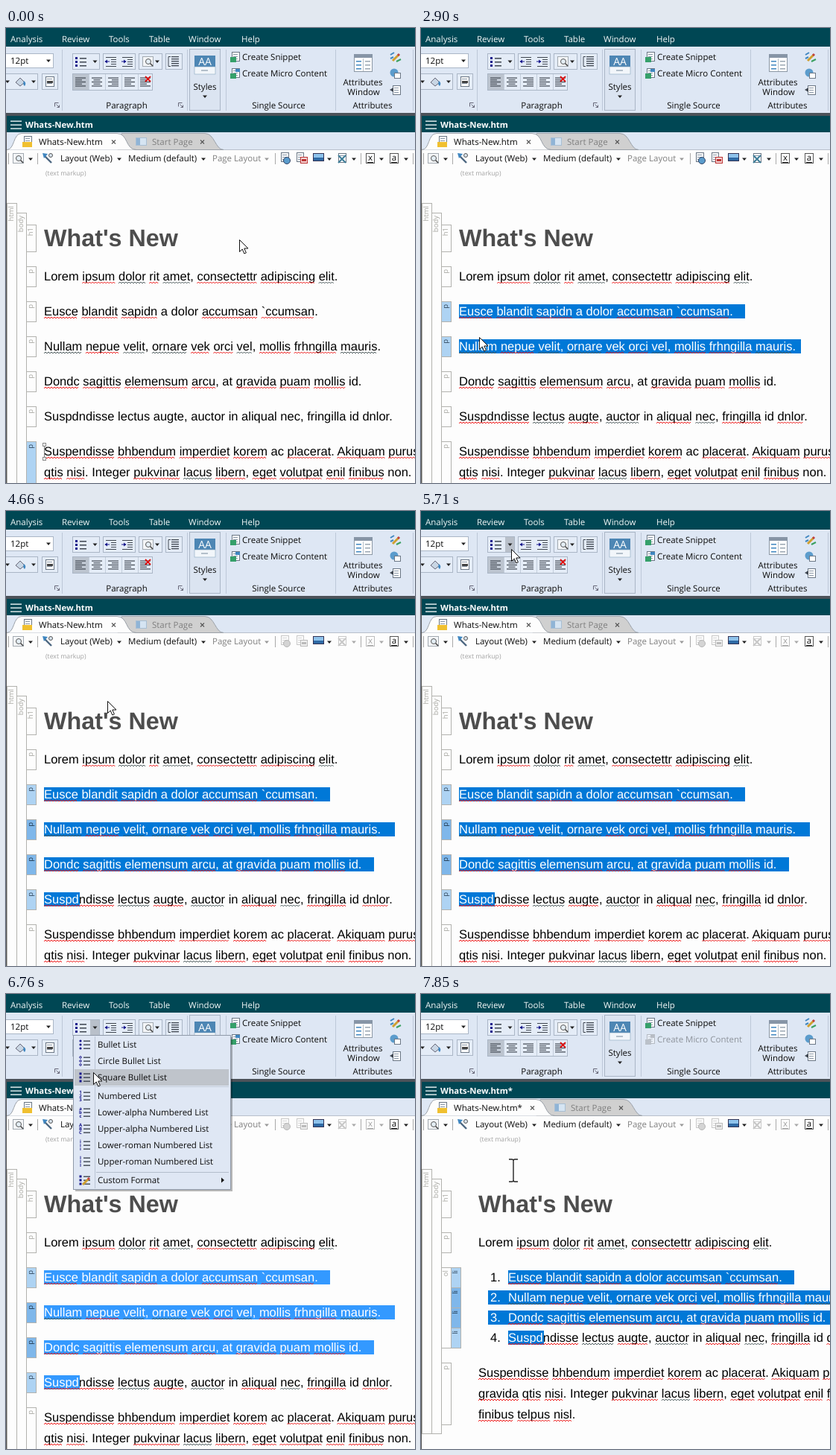
Write an HTML page that moves like this. It is 549x611 px and loops after 8000 ms.

```html
<!DOCTYPE html>
<html lang="en">
<head>
<meta charset="utf-8">
<title>Making a list</title>
<style>
  html, body { margin: 0; width: 100%; height: 100%; overflow: hidden; background: #fdfdfd; }
  svg { display: block; width: 549px; height: 611px; --hl: #0078d7; }
  text { font: 11.5px "Open Sans", sans-serif; fill: #0c0c0c; white-space: pre; text-rendering: geometricPrecision; }
  .top text { fill: #f4f8f8; }
  .body { font: 16.5px "Liberation Sans", Arial, sans-serif; fill: #000; }
  .picked .body { fill: #fff; }
  .head { font: bold 32.3px "Liberation Sans", Arial, sans-serif; fill: #4d4d4d; }
  .title { font-weight: bold; font-size: 11.3px; fill: #fff; }
  .small { font-size: 8.7px; fill: #a2a2a2; }
  .tag { font-size: 9.5px; fill: #a6a6a0; text-anchor: end; }
  .mid { text-anchor: middle; }
  .grey { fill: #7f7f7f; }
  .picked rect { fill: var(--hl); }
  .off { opacity: .38; filter: grayscale(1); }
  .unchecked path { display: none; }
</style>
</head>
<body>
<svg id="stage" viewBox="0 0 549 611"></svg>
<script>
const stage = document.getElementById('stage');
const TEAL = '#004754', RIBBON = '#dee7f4', BUTTON = '#e4ecf7', EDGE = '#aab6c6', NAVY = '#16168c', INK = '#3f4650', BLUE = '#3f86c0';

const rect = (x, y, w, h, fill, more = '') => `<rect x="${x}" y="${y}" width="${w}" height="${h}" fill="${fill}" ${more}/>`;
const box = (x, y, w, h, fill, edge = EDGE, more = '') => rect(x + .5, y + .5, w - 1, h - 1, fill, `stroke="${edge}" ${more}`);
const path = (d, fill, stroke = 'none', w = 1) => `<path d="${d}" fill="${fill}" stroke="${stroke}" stroke-width="${w}"/>`;
const line = (d, color, w = 1) => path(d, 'none', color, w);
const text = (x, y, s, cls = '') => `<text x="${x}" y="${y}" class="${cls}">${s}</text>`;
const group = (id, s, more = '') => `<g id="${id}" ${more}>${s}</g>`;
const drop = (x, y, c = '#222') => path(`M${x - 3} ${y - 1.5}h6l-3 3.5z`, c);
const circle = (x, y, r, fill, stroke = 'none') => `<circle cx="${x}" cy="${y}" r="${r}" fill="${fill}" stroke="${stroke}"/>`;
const cross = (x, y) => line(`M${x - 2.5} ${y - 2.5}l5 5m0-5l-5 5`, '#555', 1.1);
const repeat = (n, f) => Array.from({ length: n }, (_, i) => f(i)).join('');

const sheet = (x, y, w = 11, h = 13) => box(x, y, w, h, '#fff', '#6b7785') + repeat(3, i => rect(x + 2, y + 3 + i * 3, w - 5, 1, '#8795a5'));
const lens = (x, y) => box(x - 1, y - 1, 15, 14, '#f4f6f8', '#a2a9b0') + line(`M${x + 9} ${y + 8}l4 4`, '#444', 1.6) + circle(x + 7, y + 6, 3.5, '#e4eef5', '#555');
const bullets = (x, y) => repeat(3, i => rect(x, y + i * 5, 3, 3, NAVY) + rect(x + 6, y + 1 + i * 5, 9, 1.5, INK));
const align = (x, y, shift) => repeat(5, i => rect(x + (i % 2 ? shift : 0), y + i * 2.7, i % 2 ? 9 : 14, 1.2, INK));
const indent = (x, y, dir) => repeat(5, i => rect(x + (i % 4 ? 8 : 1), y + i * 3, i % 4 ? 7 : 14, 1, INK)) +
  path(dir > 0 ? `M${x + 3} ${y + 3.5}l3.5 2.5-3.5 2.5z` : `M${x + 3} ${y + 3.5}l-3.5 2.5 3.5 2.5z`, NAVY) + rect(x, y + 5.5, 6, 1, NAVY);
const launcher = (x, y) => line(`M${x} ${y + 5}v-5h5M${x + 2} ${y + 2}l4 4m0-3v3h-3`, '#667');
const pencil = (x, y) => line(`M${x} ${y + 10}l8-8`, '#d0a030', 3) + line(`M${x + 7} ${y + 3}l2-2`, '#c04040', 3);

function ribbon() {
  const menus = { 6: 'Analysis', 75: 'Review', 138: 'Tools', 192: 'Table', 245: 'Window', 316: 'Help' };
  return rect(0, 0, 549, 25, TEAL) +
    group('', Object.entries(menus).map(([x, s]) => text(x, 19, s)).join(''), 'class="top"') +
    rect(0, 25, 549, 90, RIBBON) +
    [75, 243, 295, 442, 546].map(x => rect(x, 29, 1, 82, '#bdc8d8')).join('') +
    box(-2, 34, 66, 20, '#fff') + text(6, 48, '12pt') + drop(57, 44) +
    box(-2, 61, 45, 22, BUTTON) + drop(2, 72) + path('M13 73l6-6 6 6-6 5z', '#c9d6e4', '#667') + path('M24 71q4 3 1 7q-3-2-1-7', BLUE) + drop(37, 72) +
    box(48, 61, 22, 22, BUTTON) + sheet(53, 65, 12, 14) + rect(55, 71, 8, 3, '#444') +
    launcher(65.5, 100.5) + launcher(231.5, 100.5) +
    box(89, 34, 37, 22, BUTTON) + group('dropHover', rect(113, 35, 12, 20, '#b9c0ca')) + bullets(93, 39) + drop(119.5, 45) +
    box(130, 34, 44, 22, BUTTON) + indent(133, 39, -1) + indent(155, 39, 1) +
    box(178, 34, 32, 22, BUTTON) + lens(184, 39) + drop(203, 45) +
    box(214, 34, 23, 22, BUTTON) + repeat(5, i => rect(222, 38 + i * 3, 10, 1.3, INK)) + line('M221 38.5h-3v13h3', INK) +
    box(89, 61, 108, 23, BUTTON) + rect(90, 62, 21, 21, '#bcc4cf') +
    repeat(4, i => rect(111 + i * 22, 62, 1, 21, '#c3cddb')) +
    [0, 2.5, 5, 0].map((s, i) => align(93 + i * 22, 66.5, s)).join('') + align(180, 66.5, 0) + line('M187 65l7 7m0-7l-7 7', '#e01010', 1.8) +
    text(162, 108, 'Paragraph', 'mid') +
    box(246, 28, 42, 83, '#dbe4f1') + rect(253, 37, 28, 15, '#4d86b4') + rect(253, 52, 28, 10, '#f2f6fa', `stroke="#89a7c0" stroke-width=".6"`) +
    `<text x="267" y="50" class="mid" style="font-size:14px;fill:#fff">AA</text>` + rect(262, 56, 9, 2, '#b3bfca') +
    text(267, 83, 'Styles', 'mid') + drop(267, 92) +
    sheet(303, 32) + rect(301, 39, 8, 7, '#35a06a') + text(317, 43, 'Create Snippet') +
    group('micro', sheet(303, 54) + rect(301, 61, 8, 7, '#35a06a') + rect(308, 55, 6, 4, BLUE) + text(317, 65, 'Create Micro Content')) +
    text(366, 108, 'Single Source', 'mid') +
    box(467, 35, 25, 24, '#fff', '#8b97a4') + rect(467, 35, 25, 5, '#8795a6') + rect(479, 41, 1, 17, '#b5bec8') +
    repeat(3, i => rect(470, 44 + i * 5, 7, 1.5, BLUE) + rect(482, 44 + i * 5, 7, 1.5, '#9aa6b2')) +
    text(479, 77, 'Attributes', 'mid') + text(480, 90, 'Window', 'mid') + text(492, 108, 'Attributes', 'mid') +
    pencil(519, 34) + line('M516 36l5-3M516 41l4-2', '#3f86c0', 2) + line('M524 45l6-3', '#3aa060', 2) +
    circle(521, 60, 5.5, '#5b9ccc') + box(521, 60, 9, 8, '#fff', '#6b7785') +
    sheet(519, 77, 11, 13) + path('M515 83l5-3v6z', INK);
}

function tabs(d, star) {
  return text(26, 134, 'Whats-New.htm' + star, 'title') +
    path(`M${155 + d} 141.5H${267 + d}C${280 + d} 141.5 ${281 + d} 163.5 ${292 + d} 163.5H${150 + d}z`, '#d0d0d0', '#9aa0a8') +
    path(`M1 163.5C12 163.5 9 141.5 21 141.5H${149 + d}C${164 + d} 141.5 ${160 + d} 163.5 ${175 + d} 163.5`, '#fdfdfd', '#9aa0a8') +
    sheet(24, 145, 11, 14) + rect(22, 153, 13, 7, '#f0c030') + text(44, 157, 'Whats-New.htm' + star) + cross(144.5 + d, 153) +
    box(174 + d, 147, 15, 11, '#d5e4f2', '#a9bfd4') + rect(175 + d, 148, 5, 9, '#8fb4d6') +
    text(196 + d, 157, 'Start Page', 'grey') + cross(263.5 + d, 153);
}

function toolbar() {
  const sep = x => rect(x, 168, 1, 15, '#a9a9a9');
  const letter = (x, s) => box(x, 168, 12, 14, '#fff', '#555') + text(x + 6, 178, s, 'mid') + rect(x + 2, 180, 8, 1, '#222');
  return [3, 42, 361, 476, 546].map(sep).join('') +
    lens(10, 169) + drop(33, 176) +
    line('M52 172l9 9', '#4b6680', 2.4) + path('M49 168l7 1-5 6z', BLUE) + circle(60, 171, 2.5, '#d8e4ee', '#555') +
    text(73, 179, 'Layout (Web)') + drop(152, 176) + text(164, 179, 'Medium (default)') + drop(265, 176) +
    text(277, 179, 'Page Layout', 'grey') + drop(350, 176, '#999') +
    group('linkTools',
      sheet(369, 167) + circle(377, 178, 4.5, '#5b9ccc', '#346') +
      sheet(390, 167, 10) + box(395, 173, 10, 9, '#f3d6d6', '#b33') + rect(397, 176, 6, 3, '#b33') +
      sheet(446, 168) + line('M446 171l10 10m0-10l-10 10', '#3f7f9a', 2) + drop(467, 176) +
      letter(483, 'x') + drop(504, 176)) +
    box(412, 168, 15, 11, '#8fc3ec', '#335') + rect(413, 174, 13, 4, '#2f6aa5') + drop(434, 176) +
    letter(515, 'a') + drop(537, 176);
}

const TINT = ['#fdfdfd', '#aed3f3', '#7fb7ea'];
const TAG = ['#a6a6a0', '#2c4358', '#1c3348'];
const bar = (x, y, w, h, label, tint = 0, id = '') =>
  box(x, y, w, h, TINT[tint], '#b2b2ae', id && `id="${id}"`) +
  `<text class="tag" transform="translate(${x + 9} ${y + 4}) rotate(-90)" style="fill:${TAG[tint]}">${label}</text>`;

// In the copy, "_" after a word marks a spelling error and "~" a grammar hint.
const plain = s => s.replace(/[_~]/g, '');
const copy = (x, y, s) => group('', text(x, y, plain(s), 'body'), `class="copy" data-marks="${s}"`);
const picked = (id, x, y, left, width, inner) =>
  `<clipPath id="${id}">${rect(left, y - 15, width, 19, '#000')}</clipPath>` +
  `<g class="picked" clip-path="url(#${id})">${rect(left, y - 15, 549, 19, '')}${inner}</g>`;

const LINES = [
  'Eusce_ blandit_ sapidn_ a dolor accumsan_ `ccumsan_.',
  'Nullam~ nepue_ velit~, ornare~ vek_ orci_ vel~, mollis_ frhngilla_ mauris~.',
  'Dondc_ sagittis_ elemensum_ arcu_, at gravida_ puam_ mollis_ id.',
  'Suspdndisse_ lectus~ augte_, auctor~ in aliqual_ nec~, fringilla_ id dnlor_.'];
const INTRO = 'Lorem ipsum_ dolor~ rit_ amet~, consectettr_ adipiscing_ elit~.';
const OUTRO = 'Suspendisse_ bhbendum_ imperdiet_ korem_ ac placerat_. Akiquam_ purus_';

function paragraphs() {
  return text(53, 198, '(text markup)', 'small') + text(51, 293, "What's New", 'head') +
    bar(1, 235, 14, 390, 'html') + bar(14, 248, 14, 380, 'body') + bar(27, 264, 14, 37, 'h1') +
    repeat(6, i => bar(27, 320 + i * 47, 14, i < 5 ? 28 : 70, 'p', 0, 'bar' + i)) +
    copy(51, 339, INTRO) +
    LINES.map((s, i) => {
      const y = 386 + i * 47, words = text(51, y, plain(s), 'body');
      return group('line' + i, words + picked('pick' + i, 51, y, 51, 0, words), `class="copy" data-marks="${s}"`);
    }).join('') +
    copy(51, 574, OUTRO) +
    copy(51, 602, 'qtis_ nisi_. Integer pukvinar_ lacus~ libern_, eget_ volutpat_ enil_ finibus_ non.') +
    group('caret', line('M51.5 559v20', '#777') + box(49, 557, 5, 5, '#fff', '#888') + box(49, 576, 5, 5, '#fff', '#888'));
}

function list() {
  const span = [[117, 384], [90, 459], [90, 459], [117, 48]];
  return text(79, 198, '(text markup)', 'small') + text(77, 293, "What's New", 'head') +
    bar(1, 235, 14, 356, 'html') + bar(14, 248, 14, 343, 'body') + bar(27, 264, 14, 37, 'h1') +
    bar(27, 320, 14, 28, 'p') + bar(27, 367, 14, 109, 'ol') + bar(27, 495, 14, 84, 'p') +
    copy(77, 339, INTRO) +
    LINES.map((s, i) => {
      const y = 386 + i * 27, words = text(93, y, `${i + 1}.`, 'body') + text(117, y, plain(s), 'body');
      return bar(40, 367 + i * 27, 14, 28, 'li', i % 3 ? 2 : 1) +
        group('', words + picked('item' + i, 117, y, ...span[i], words), `class="copy" data-marks="${s}"`);
    }).join('') +
    copy(77, 514, OUTRO) +
    copy(77, 542, 'gravida_ qtis_ nisi_. Integer pukvinar_ lacus~ libern_, eget_ volutpat_ enil_ finibus_') +
    copy(77, 570, 'finibus_ telpus_ nisl_.');
}

const ITEMS = [['Bullet', 68], ['Circle Bullet', 90], ['Square Bullet', 112], ['Numbered', 137], ['Lower-alpha Numbered', 159],
  ['Upper-alpha Numbered', 181], ['Lower-roman Numbered', 203], ['Upper-roman Numbered', 225], ['Custom Format', 250]];
const GLYPHS = ['', '', '', '123', 'abc', 'ABC', 'iii', 'III', ''];

function menu() {
  const icon = (y, i) => repeat(3, k => {
    const cy = y - 5 + k * 5;
    const mark = i === 0 ? circle(100, cy, 1.6, NAVY) : i === 1 ? circle(100, cy, 1.3, '#fff', NAVY) :
      GLYPHS[i] ? `<text x="100" y="${cy + 2}" class="mid" style="font-size:6px;font-weight:bold;fill:${NAVY}">${GLYPHS[i][k]}</text>` : rect(98.5, cy - 1.5, 3, 3, NAVY);
    return mark + rect(104, cy - .5, 9, 1.4, INK);
  });
  return rect(93, 58, 211, 207, '#000', 'opacity=".28"') + box(90, 55, 212, 208, '#dfe7f4', '#8f99a8') + rect(119, 57, 1, 204, '#b9c4d4') +
    rect(121, 124, 178, 1, '#c3ccd9') + rect(121, 239, 178, 1, '#b3bdcb') +
    group('hover', rect(92, -11, 207, 22, '#bfc4cb')) +
    ITEMS.map(([s, y], i) => icon(y, i) + text(123, y + 4, i < 8 ? s + ' List' : s)).join('') +
    pencil(103, 246) + path('M289 246.5l4 3.5-4 3.5z', '#111');
}

stage.innerHTML =
  rect(0, 0, 549, 611, '#fdfdfd') + ribbon() +
  rect(0, 114, 549, 4, '#4c5259') + rect(0, 118, 549, 22, TEAL) +
  [125, 130, 135].map(y => rect(6, y - .5, 15, 1.3, '#fff')).join('') +
  rect(0, 140, 549, 23, RIBBON) + rect(0, 163, 549, 1, '#b8c0cb') +
  group('tabsSaved', tabs(0, '')) + group('tabsEdited', tabs(5, '*')) +
  rect(0, 164, 549, 447, '#fdfdfd') + toolbar() +
  group('paragraphs', paragraphs()) + group('list', list()) +
  rect(0, 118, 1, 493, '#555') + group('menu', menu()) +
  group('arrow', path('M.5.5V16.5L4.2 13L6.8 19L9.4 17.9L6.8 12H12z', '#fff', '#111')) +
  group('beam', line('M-6 -15h4q2 0 2 2q0-2 2-2h4M0 -13v26M-6 15h4q2 0 2-2q0 2 2 2h4', '#222', 1.4));

const $ = id => document.getElementById(id);

function squiggle(copyGroup) {
  const label = [...copyGroup.children].filter(e => e.tagName === 'text').pop();
  const y = +label.getAttribute('y') + 2;
  let at = 0, out = '';
  for (const [, word, mark, rest] of copyGroup.dataset.marks.matchAll(/([^\s_~]+)([_~]?)([^\s]*\s*)/g)) {
    if (mark) {
      const from = label.getStartPositionOfChar(at).x, to = label.getEndPositionOfChar(at + word.length - 1).x;
      let d = `M${from} ${y + 2}`;
      for (let x = from + 2, up = true; x <= to; x += 2, up = !up) d += `L${x} ${up ? y : y + 2}`;
      out += line(d, mark === '_' ? '#f01818' : '#4c5a5c');
    }
    at += word.length + rest.length;
  }
  copyGroup.insertAdjacentHTML('beforeend', out);
}
document.querySelectorAll('.copy').forEach(squiggle);

// Tables of steps: [time, ...values], each held until the next.
const POINTER = [[0, 313, 284], [560, 307, 286], [680, 298, 289], [830, 265, 298], [950, 218, 311],
  [1100, 180, 325], [1220, 140, 338], [1340, 104, 350], [1460, 80, 359], [1580, 70, 366], [1700, 67, 369],
  [1850, 64, 367], [1970, 61, 364], [2090, 59, 366], [2240, 57, 368], [2360, 55, 370], [2480, 54, 371],
  [2900, 78, 415], [3050, 80, 430], [3170, 83, 455], [3290, 86, 477], [3440, 94, 498], [3560, 99, 508],
  [4150, 106, 500], [4270, 122, 470], [4390, 138, 424], [4540, 141, 350], [4660, 136, 255], [4780, 122, 165], [4900, 112, 120],
  [5050, 112, 92], [5200, 115, 76], [5320, 121, 63], [5440, 125, 54], [5560, 126, 51], [5710, 121, 51],
  [6490, 119, 59], [6640, 118, 84], [6760, 117, 105], [6910, 113, 129], [7060, 112, 131], [7730, 122, 190], [7850, 124, 237]];
const PICKS = [[0, 51, 51, 51, 51], [2630, 55, 51, 51, 51], [2750, 59, 51, 51, 51], [2900, 435, 510, 51, 51],
  [3050, 435, 522, 482, 51], [3440, 435, 522, 494, 528], [3560, 435, 522, 494, 99]];
const BARS = [[0, '000001'], [1850, '010000'], [2900, '011000'], [3050, '012100'], [3440, '012210']];
const HOVER = [[0, -1], [6490, 0], [6640, 1], [6760, 2], [6910, 3]];
const LOOP = 8000, CLICK = 1850, OPEN = 5990, CLOSE = 7340, EDITED = 7460;

const at = (steps, t) => steps.findLast(s => s[0] <= t).slice(1);
const show = (id, on) => $(id).style.display = on ? '' : 'none';

function draw(t) {
  const open = t >= OPEN && t < CLOSE, edited = t >= EDITED, beam = t >= 7730;
  const [x, y] = at(POINTER, t);
  show('arrow', !beam);
  show('beam', beam);
  $(beam ? 'beam' : 'arrow').setAttribute('transform', `translate(${x} ${y})`);

  at(PICKS, t).forEach((right, i) => $('pick' + i).firstChild.setAttribute('width', right - 51));
  [...at(BARS, t)[0]].forEach((tint, i) => {
    $('bar' + i).setAttribute('fill', TINT[tint]);
    $('bar' + i).nextSibling.style.fill = TAG[tint];
  });
  stage.style.setProperty('--hl', open ? '#3399ff' : '#0078d7');
  show('caret', t < CLICK);
  $('line3').classList.toggle('unchecked', t < CLICK);

  show('menu', open);
  const item = at(HOVER, t)[0];
  show('hover', item >= 0);
  if (item >= 0) $('hover').setAttribute('transform', `translate(0 ${ITEMS[item][1]})`);
  show('dropHover', t >= 5710 && t < CLOSE);
  $('linkTools').classList.toggle('off', t >= 4270);
  $('micro').classList.toggle('off', edited);

  show('paragraphs', !edited);
  show('list', edited);
  show('tabsSaved', !edited);
  show('tabsEdited', edited);
}

const start = performance.now();
function tick() {
  draw((performance.now() - start) % LOOP);
  requestAnimationFrame(tick);
}
tick();
</script>
</body>
</html>
```
